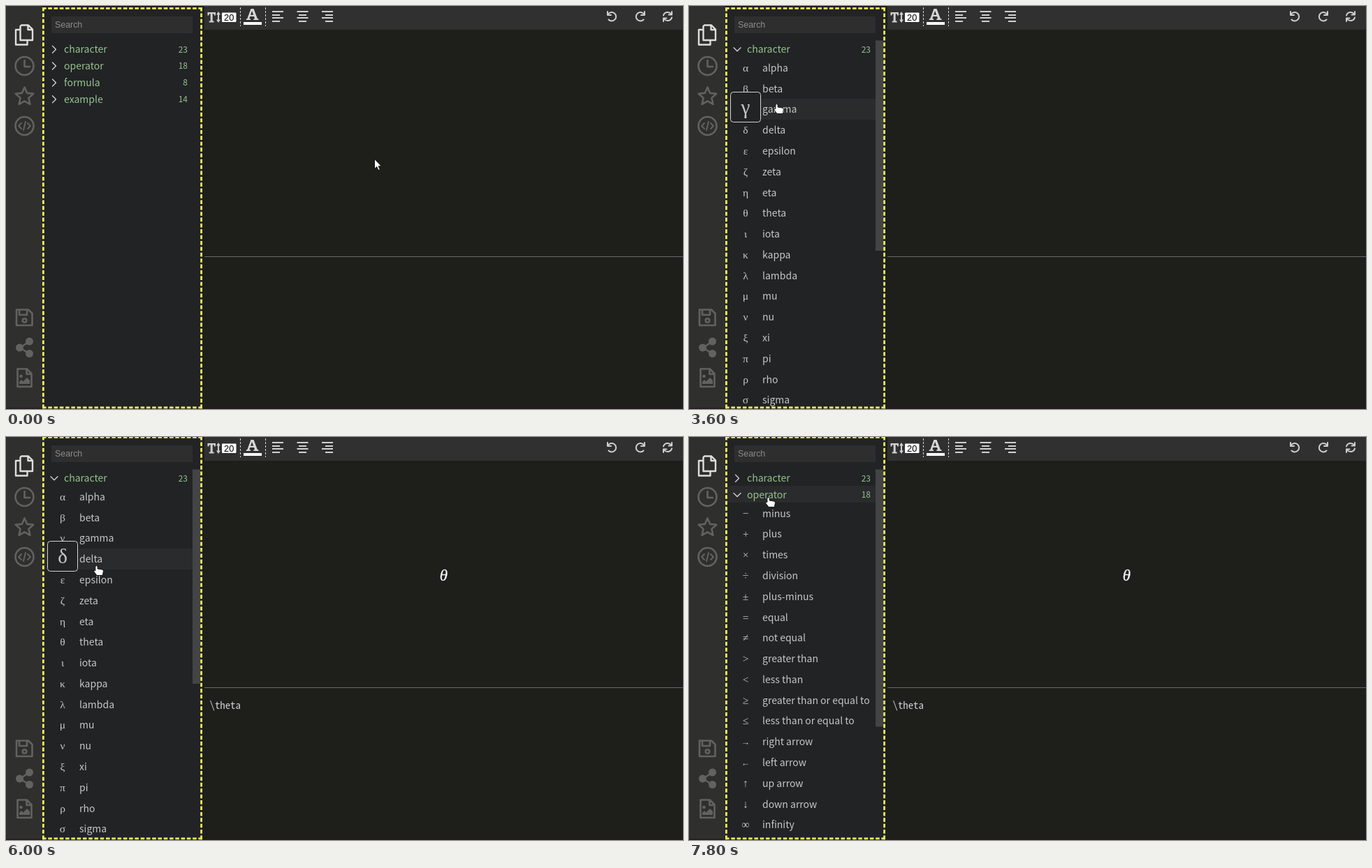
Animation, 969 px wide and 578 px high, one loop 8 s. Source, as an HTML page:

```html
<!DOCTYPE html>
<html lang="en">
<head>
<meta charset="utf-8">
<title>Formula editor</title>
<style>
html, body { margin: 0; width: 100%; height: 100%; overflow: hidden; background: #1e1f1b; }
svg { position: absolute; left: 0; top: 0; }
text { white-space: pre; }
.label { font: 14px "Noto Sans CJK SC", "Noto Sans CJK JP", "Noto Sans CJK", "Noto Sans", sans-serif; fill: #c6c6c6; }
.green { fill: #96c38d; }
.count { font-size: 12px; text-anchor: end; }
.symbol { font-family: "Liberation Serif", serif; fill: #c8c8c8; text-anchor: middle; }
.ui { font-family: "Liberation Sans", Arial, sans-serif; }
.code { font: 14.8px "Noto Sans Mono CJK SC", "Noto Sans Mono CJK JP", "Noto Sans Mono", monospace; fill: #cfcfcf; }
.result { font: italic 23px "Liberation Serif", serif; fill: #f4f4f4; stroke: #f4f4f4; stroke-width: .3; text-anchor: middle; }
.line { fill: none; stroke-linejoin: round; stroke-linecap: round; }
</style>
</head>
<body>
<svg width="969" height="578" viewBox="0 0 969 578">
  <rect width="969" height="578" fill="#1e1f1b"/>
  <rect width="52" height="578" fill="#2f2f2e"/>
  <rect x="284" width="685" height="34" fill="#303030"/>
  <rect x="284" y="359" width="685" height="1" fill="#686868"/>
  <rect y="576.5" width="969" height="1.5" fill="#241a20"/>

  <!-- side bar -->
  <g class="line" stroke="#dedede" stroke-width="2.4">
    <path d="M22 27.5h10l6 6V49H20.500V29zM31.500 28v6H38M20 34h-6v21.500h16.500V50"/>
  </g>
  <g class="line" stroke="#626262" stroke-width="2.6">
    <circle cx="26.500" cy="86" r="13"/>
    <path d="M26.500 78v9H34"/>
    <path id="star"/>
    <circle cx="26.500" cy="172" r="13"/>
    <path stroke-width="2" d="M22 168l-4 4 4 4M31 168l4 4-4 4M28 166l-3 12"/>
    <path d="M15 435.500h17l5.500 5.500v17H15zM19 436v7h11v-7"/>
    <circle cx="26.500" cy="451" r="2.800"/>
    <path d="M33 481.500L20 490l13 8.500"/>
    <path d="M16.500 520.500H30l6.500 7v18.500h-20zM29.500 521v7H36"/>
  </g>
  <g fill="#626262">
    <circle cx="33.500" cy="481" r="5.500"/><circle cx="19.500" cy="490" r="5.500"/><circle cx="33.500" cy="498.500" r="5.500"/>
    <circle cx="21.500" cy="531" r="2.300"/><path d="M19 542v-3l3-3 2.500 2.500 5.500-5.500 4 4v5z"/>
  </g>

  <!-- tool bar -->
  <g fill="#cfcfcf">
    <path d="M288.500 9h11.500v4.500h-1.800l-.7-2.200h-1.800v10l2 .5v1.700h-7v-1.700l2-.5v-10h-1.700l-.7 2.200h-1.800z"/>
    <path d="M304 8l3 4.500h-2v7h2l-3 4.500-3-4.500h2v-7h-2z"/>
    <path id="align"/>
  </g>
  <rect x="309" y="9.500" width="20.500" height="13.500" rx="1" fill="#fff"/>
  <text class="ui" x="319.200" y="20.700" font-size="12.800" text-anchor="middle">20</text>
  <path d="M335.500 2v27M371.500 2v27" stroke="#d8d8d8" stroke-dasharray="3 2"/>
  <path fill="#d8d8d8" fill-rule="evenodd" d="M350.500 4h4l5.300 14 1.700.4V20h-7.200v-1.600l1.800-.4-1-2.900h-5.800l-1 2.900 1.800.4V20h-6.300v-1.600l1.600-.4zM350 12.800h4.200L352.100 7z"/>
  <rect x="340" y="23" width="26" height="4" fill="#fff"/>
  <g class="line" stroke="#cfcfcf" stroke-width="2">
    <path id="turn" d="M862 11.500a6.200 6.200 0 1 1 .5 8M861 8v5h5"/>
    <use href="#turn" transform="matrix(-1 0 0 1 1775 0)"/>
    <path id="half" d="M941 13.500a6.200 6.200 0 0 1 11-2M953 8v4.500h-4.500"/>
    <use href="#half" transform="rotate(180 947 15)"/>
  </g>

  <g id="output">
    <text class="result" x="626.500" y="206">θ</text>
    <text class="code" x="291.500" y="390">\theta</text>
  </g>
  <g id="panel"></g>
  <g id="pointer" stroke="#161616" stroke-linejoin="round" fill="#fff">
    <path id="arrow" d="M.5.5v14l3.200-2.900 2.300 5 2.300-1-2.200-4.800h4.200z"/>
    <path id="hand" d="M4.500.6q1.600 0 1.600 1.600V5l7 1.200q1.400.4 1.300 2l-1 6.300H5L.8 9q-.6-2 1.600-1.700l.5.4V2.200Q2.900.6 4.500.6z"/>
  </g>
</svg>
<script>
const $ = id => document.getElementById(id);
const LOOP = 8000, STEP = 100, PITCH = 29.775, HEAD = 23.8;
const INSERT = 5100;

const groups = [
  { name: 'character', count: 23, thumb: 307.5, symbols: 'αβγδεζηθικλμνξπρσ',
    items: 'alpha,beta,gamma,delta,epsilon,zeta,eta,theta,iota,kappa,lambda,mu,nu,xi,pi,rho,sigma' },
  { name: 'operator', count: 18, thumb: 369, symbols: '−+×÷±=≠><≥≤→←↑↓∞',
    items: 'minus,plus,times,division,plus-minus,equal,not equal,greater than,less than,greater than or equal to,less than or equal to,right arrow,left arrow,up arrow,down arrow,infinity' },
  { name: 'formula', count: 8 },
  { name: 'example', count: 14 }
];

// pointer strokes: start, end, then the x, y reached
const origin = [527, 219];
const strokes = [
  [0, 100, 525, 214], [300, 400, 515, 200], [500, 900, 272, 117], [1000, 1400, 163, 66],
  [1500, 1600, 162, 65], [3100, 3600, 121, 140], [3600, 4000, 122, 254], [4100, 4500, 125, 280],
  [4600, 4700, 125, 296], [5600, 6000, 125, 184], [6000, 6500, 110, 64], [6500, 6700, 107, 57],
  [7200, 7300, 112, 113], [7300, 7400, 109, 86]
];

const ease = k => k * k * (3 - 2 * k);

function pointerAt(t) {
  const now = Math.floor(t / STEP) * STEP;
  let [x, y] = origin;
  for (const [from, to, toX, toY] of strokes) {
    if (now <= from) break;
    const k = ease(Math.min(1, (now - from) / (to - from)));
    x += (toX - x) * k;
    y += (toY - y) * k;
  }
  return [Math.round(x), Math.round(y)];
}

// index of the open group
const openAt = t => t < 2400 ? -1 : t < 7000 ? 0 : t < 7800 ? -1 : 1;

const escape = s => s.replace('<', '&lt;').replace('>', '&gt;');
const text = (cls, x, y, s, extra = '') =>
  `<text class="${cls}" x="${x}" y="${Math.round(y)}" ${extra}>${escape(String(s))}</text>`;
const box = (x, y, w, h, fill, extra = '') =>
  `<rect x="${x}" y="${y}" width="${w}" height="${h}" fill="${fill}" ${extra}/>`;
const symbol = (s, y, size) =>
  text('symbol', 81, y, s, `font-size="${'→←'.includes(s) ? size * 0.8 : size}"`);

// dashes spread so that both ends of a side carry one
function dashes(d, length) {
  const dash = 5.6, count = Math.round((length - dash) / (dash * 1.5));
  const gap = (length - dash) / count - dash;
  return `<path d="${d}" stroke="#f3f15c" stroke-width="2.8" stroke-dasharray="${dash} ${gap}"/>`;
}

function border(left, top, right, bottom) {
  const w = right - left, h = bottom - top, in_ = 1.4;
  return [top + in_, bottom - in_].map(y => dashes(`M${left} ${y}h${w}`, w)).join('') +
    [left + in_, right - in_].map(x => dashes(`M${x} ${top}v${h}`, h)).join('');
}

function header(group, y, open) {
  const chevron = open ? `M64 ${y + 10.5}l5 5 5-5` : `M66.500 ${y + 8}l5 5-5 5`;
  return `<path class="line" stroke="#d0d0d0" stroke-width="1.4" d="${chevron}"/>` +
    text('label green', 83, y + 18, group.name) +
    text('label green count', 260, y + 17.3, group.count);
}

function drawPanel(open, shift, hotX, hotY) {
  let out = box(52, 2 + shift, 229, 577, '#212325') +
    box(65, 15 + shift, 202, 24, '#2e2e2e') +
    text('ui', 70, 31 + shift, 'Search', 'font-size="12.4" fill="#8c8c8c"');
  const width = open < 0 ? 223 : 212;
  const hover = (y, h) => hotX < 278 && hotY >= y && hotY < y + h;
  let y = 49.3 + shift, popup = '';
  for (const [g, group] of groups.entries()) {
    if (hover(y, HEAD)) out += box(55, Math.round(y), width, 24, '#2a2b2d');
    out += header(group, y, g === open);
    y += HEAD;
    if (g !== open) continue;
    y += 0.8;
    group.items.split(',').forEach((name, i) => {
      const s = group.symbols[i];
      if (hover(y, PITCH)) {
        const top = Math.floor(y - 10.3) + 0.5;
        out += box(55, Math.round(y), width, 30, '#2a2b2d');
        popup = box(59.5, top, 43, 43, '#212325', 'rx="4" stroke="#d2d2d2"') + symbol(s, top + 31.5, 29);
      }
      out += symbol(s, y + 20, 15.5) + text('label', 105, y + 20, name);
      y += PITCH;
    });
    // the open list fills the rest of the panel
    out += box(267, 49.5 + shift, 11, group.thumb + (shift ? 0 : -6), '#434445');
    break;
  }
  $('panel').innerHTML = out + popup + border(52, 2 + shift, 281, 577.2);
}

let last = '';
function draw(t) {
  const [x, y] = pointerAt(t), open = openAt(t), done = t >= INSERT;
  const key = [x, y, open, done].join();
  if (key === last) return;
  last = key;
  const inside = x < 278;
  drawPanel(open, done ? -3 : 0, x + 4, y + 3);
  $('output').style.display = done ? '' : 'none';
  $('pointer').setAttribute('transform', `translate(${x} ${y})`);
  $('arrow').style.display = inside ? 'none' : '';
  $('hand').style.display = inside ? '' : 'none';
}

// static icons built from simple rules
$('star').setAttribute('d', 'M' + Array.from({ length: 10 }, (_, i) => {
  const r = i % 2 ? 6.3 : 13.5, a = i * Math.PI / 5 - Math.PI / 2;
  return (26.5 + r * Math.cos(a)).toFixed(1) + ' ' + (130 + r * Math.sin(a)).toFixed(1);
}).join('L') + 'z');
$('align').setAttribute('d', [0, 1, 2].map(side =>
  [16, 11, 16, 11].map((w, i) =>
    `M${381 + 35.5 * side + (16 - w) * side / 2} ${Math.round(7 + i * 4.7)}h${w}v2h${-w}z`).join('')).join(''));

const start = performance.now();
function tick() {
  draw((performance.now() - start) % LOOP);
  requestAnimationFrame(tick);
}
tick();
</script>
</body>
</html>
```
